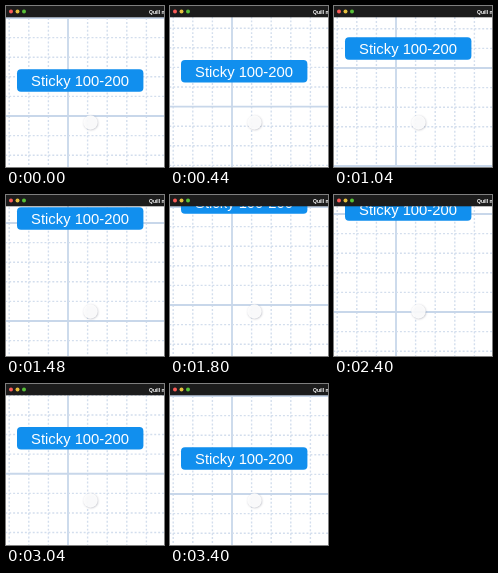
Recreate the animation shown at these times as an HTML page with a canvas. Size 158 px wide and 161 px high, loop 3600 ms.

```html
<!DOCTYPE html>
<html lang="en">
<head>
<meta charset="utf-8">
<title>Sticky label</title>
<style>
  html, body { margin: 0; width: 100%; height: 100%; overflow: hidden; background: #fff; }
  canvas { display: block; width: 158px; height: 161px; }
</style>
</head>
<body>
<canvas width="158" height="161"></canvas>
<script>
const WIDTH = 158, HEIGHT = 161, BAR = 11.3;
const LOOP = 3600, STEP = 40;
const CELL = 19.6, STICKY_TOP = 31.3, STICKY_LENGTH = 31;
const ctx = document.querySelector('canvas').getContext('2d');

// Scroll path: time (ms), offset (px), speed (px/ms)
const path = [
  [0, -32, 0], [720, -7, 0.069], [1040, 16, 0.076], [1480, 50, 0.075], [1800, 66, 0],
  [2160, 66, 0], [2400, 59, -0.06], [2680, 31, -0.125], [3400, -32, 0], [LOOP, -32, 0]
];

function scrollAt(time) {
  const i = path.findIndex(key => key[0] > time);
  const [t0, y0, v0] = path[i - 1], [t1, y1, v1] = path[i];
  const d = t1 - t0, u = (time - t0) / d, w = 1 - u;
  return w * w * ((1 + 2 * u) * y0 + u * d * v0) + u * u * ((3 - 2 * u) * y1 - w * d * v1);
}

function line(x0, y0, x1, y1, solid) {
  ctx.strokeStyle = solid ? '#c8d7ea' : '#d3deed';
  ctx.lineWidth = solid ? 1.8 : 1.4;
  ctx.setLineDash(solid ? [] : [CELL / 10, CELL / 10]);
  ctx.beginPath();
  ctx.moveTo(x0, y0);
  ctx.lineTo(x1, y1);
  ctx.stroke();
}

function drawGrid(scroll) {
  const left = 62 - 5 * CELL, top = 78 - 10 * CELL - scroll;
  for (let i = 0; i < 20; i++) {
    const x = left + i * CELL, y = top + i * CELL, solid = i % 5 === 0;
    line(x, top, x, top + 20 * CELL, solid);
    line(left, y, left + 12 * CELL, y, solid);
  }
}

function text(string, x, y, font, align) {
  ctx.font = font + ' "Liberation Sans", Arial, sans-serif';
  ctx.textAlign = align;
  ctx.fillStyle = '#fff';
  ctx.fillText(string, x, y);
}

function drawLabel(scroll) {
  const y = STICKY_TOP - Math.min(scroll, 0) - Math.max(scroll - STICKY_LENGTH, 0);
  ctx.fillStyle = '#118fee';
  ctx.beginPath();
  ctx.roundRect(11, y, 126.4, 22.5, 4);
  ctx.fill();
  text('Sticky 100-200', 74, y + 16.8, '14.8px', 'center');
}

function disc(x, y, radius, color) {
  ctx.fillStyle = color;
  ctx.beginPath();
  ctx.arc(x, y, radius, 0, Math.PI * 2);
  ctx.fill();
}

function drawPointer() {
  ctx.save();
  ctx.shadowColor = 'rgba(60, 65, 85, 0.35)';
  ctx.shadowBlur = 2;
  ctx.shadowOffsetX = ctx.shadowOffsetY = 0.5;
  disc(84.5, 116.5, 7.2, 'rgba(255, 255, 255, 0.9)');
  ctx.restore();
}

function drawTitleBar() {
  ctx.fillStyle = '#1c1c1c';
  ctx.fillRect(0, 0, WIDTH, BAR);
  ['#fc5b57', '#e5bf3c', '#57c038'].forEach((color, i) => disc(5 + i * 6.5, 5.6, 2, color));
  text('Quill nTab', 143, 7.6, 'bold 5px', 'left');
}

function draw(now) {
  const scroll = scrollAt(Math.floor(now % LOOP / STEP) * STEP);
  ctx.fillStyle = '#fff';
  ctx.fillRect(0, 0, WIDTH, HEIGHT);
  drawGrid(scroll);
  drawLabel(scroll);
  drawPointer();
  drawTitleBar();
  requestAnimationFrame(draw);
}

const start = performance.now();
requestAnimationFrame(function first() { draw(0); });
const paint = draw;
draw = () => paint(performance.now() - start);
</script>
</body>
</html>
```
